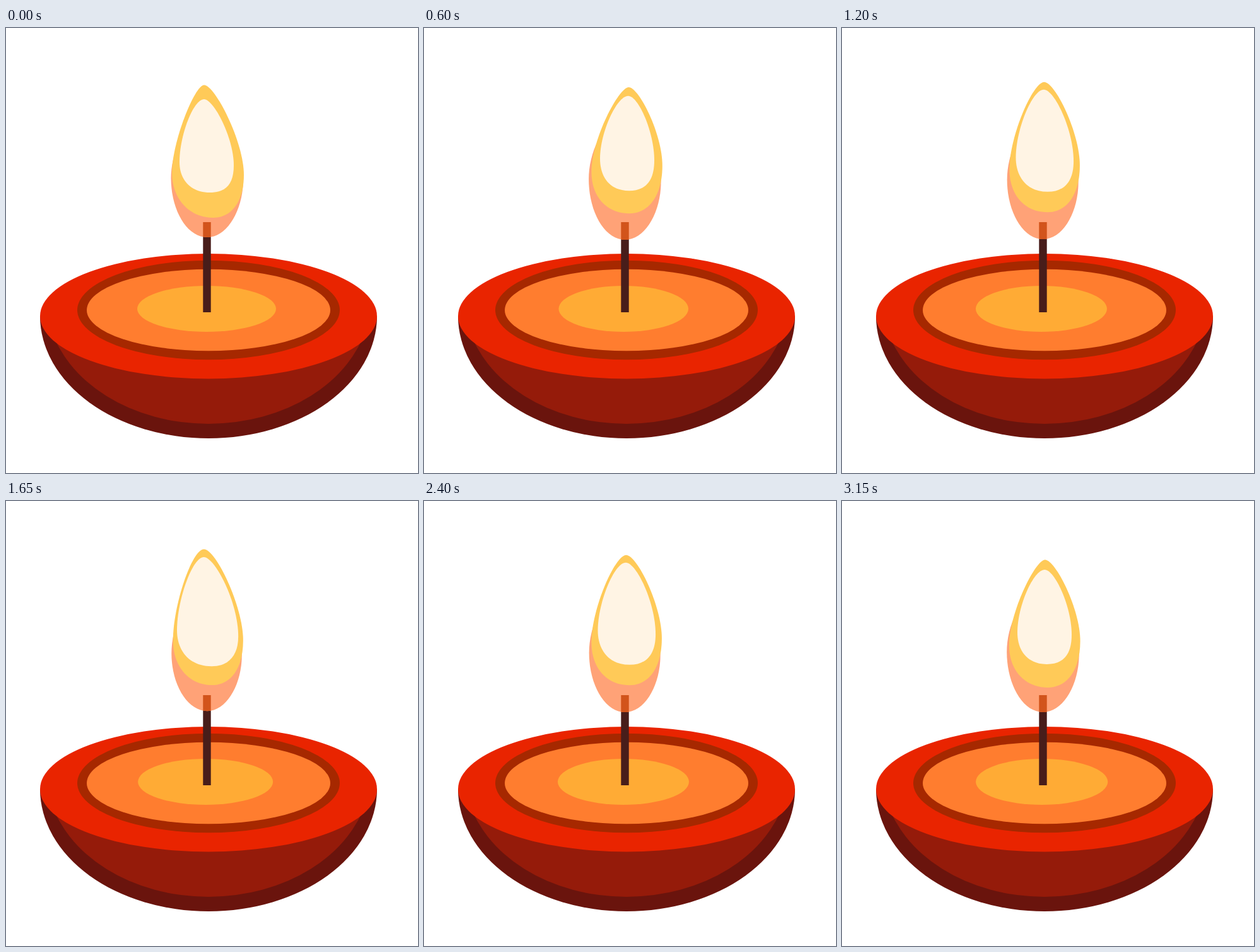
Write an HTML page that moves like this. It is 653 by 706 pixels and loops after 3.3 s.

```html
<!DOCTYPE html>
<html lang="en">
<head>
<meta charset="utf-8">
<title>Oil lamp</title>
<style>
  html, body { margin: 0; width: 100%; height: 100%; overflow: hidden; background: #fff; }
  svg { display: block; width: 653px; height: 706px; }

  /* 22 held poses of 150 ms: lean right, stretch up, settle back, then cut to the start */
  .glow, .flame, .core, .pool { animation: 3300ms infinite; }
  .glow { animation-name: glow; fill: #ffa277; }
  .tip { fill: #d2541b; }
  .flame { animation-name: flame; fill: #ffca58; }
  .core { animation-name: core; fill: #fff4e4; }
  .pool { animation-name: pool; fill: #ffab35; }

  @keyframes glow {
    0% {
      animation-timing-function: steps(5);
      d: path("M319 140C340 140 376 195 376 240C376 288 351 332 319 332C286 332 261.5 288 261.5 238C261.5 200 281 150 319 140Z");
    }
    22.7273% {
      animation-timing-function: steps(7);
      d: path("M319 140C340 140 375.5 200 375.5 245C375.5 294 350 337 318.5 337C286 337 261 292 261 240C261 200 281 150 319 140Z");
    }
    54.5455% {
      animation-timing-function: steps(7);
      d: path("M319 140C340 140 373.5 200 373.5 245C373.5 288 351 332.5 319 332.5C287 332.5 262.5 290 262.5 242C262.5 202 282 150 319 140Z");
    }
    86.3636% {
      animation-timing-function: steps(3);
      d: path("M319 140C340 140 375.5 200 375.5 245C375.5 294 350 337 318.5 337C286 337 261 292 261 240C261 200 281 150 319 140Z");
    }
    100% {
      d: path("M319 140C340 140 375.8 197 375.8 242C375.8 290.4 350.6 334 318.8 334C286 334 261.3 289.6 261.3 238.8C261.3 200 281 150 319 140Z");
    }
  }

  @keyframes flame {
    0% {
      animation-timing-function: steps(5);
      d: path("M314 90.5C331 90.5 377 180 377 233C377 275 358 301 328 301C290 301 263 270 263 230C263 181 299 90.5 314 90.5Z");
    }
    22.7273% {
      animation-timing-function: steps(7);
      d: path("M327 95C343 95 378 165 378 215C378 263 356 292.5 325 292.5C290 292.5 266 268 266 228C266 176 311 95 327 95Z");
    }
    54.5455% {
      animation-timing-function: steps(7);
      d: path("M311.5 73.5C331 73.5 375.5 168 375.5 222C375.5 265 357 292 327 292C290 292 264.5 262 264.5 220C264.5 164 292 73.5 311.5 73.5Z");
    }
    86.3636% {
      animation-timing-function: steps(3);
      d: path("M327 95C343 95 378 165 378 215C378 263 356 292.5 325 292.5C290 292.5 266 268 266 228C266 176 311 95 327 95Z");
    }
    100% {
      d: path("M319.2 92.3C335.8 92.3 377.4 174 377.4 225.8C377.4 270.2 357.2 297.6 326.8 297.6C290 297.6 264.2 269.2 264.2 229.2C264.2 179 303.8 92.3 319.2 92.3Z");
    }
  }

  @keyframes core {
    0% {
      animation-timing-function: steps(5);
      d: path("M314 113C329 113 361 174 361 218C361 246 350 261 323 261C292 261 275 240 275 213C275 170 297 113 314 113Z");
    }
    22.7273% {
      animation-timing-function: steps(7);
      d: path("M326 106.5C342.5 106.5 366 163 366 208C366 240 353 257.5 325.5 257.5C294 257.5 280 234 280 206C280 164 308 106.5 326 106.5Z");
    }
    54.5455% {
      animation-timing-function: steps(7);
      d: path("M311.5 86C329 86 368.5 160 368.5 216C368.5 246 353 263 326 263C290 263 269.5 238 269.5 205C269.5 157 293 86 311.5 86Z");
    }
    86.3636% {
      animation-timing-function: steps(3);
      d: path("M326 106.5C342.5 106.5 366 163 366 208C366 240 353 257.5 325.5 257.5C294 257.5 280 234 280 206C280 164 308 106.5 326 106.5Z");
    }
    100% {
      d: path("M318.8 110.4C334.4 110.4 363 169.6 363 214C363 243.6 351.2 259.6 324 259.6C292.8 259.6 277 237.6 277 210.2C277 167.6 301.4 110.4 318.8 110.4Z");
    }
  }

  @keyframes pool {
    0% { animation-timing-function: steps(5); cx: 318px; rx: 110px; }
    22.7273% { animation-timing-function: steps(7); cx: 315.8px; rx: 101px; }
    54.5455% { animation-timing-function: steps(7); cx: 316.2px; rx: 108px; }
    86.3636% { animation-timing-function: steps(3); cx: 315.8px; rx: 101px; }
    100% { cx: 317.1px; rx: 106.4px; }
  }
</style>
</head>
<body>
<svg viewBox="0 0 653 706">
  <clipPath id="wick"><rect x="312.3" y="308" width="12.4" height="143"/></clipPath>
  <!-- bowl -->
  <path fill="#6a140d" d="M54 457A267 194 0 0 0 588 457Z"/>
  <path fill="#951b0a" d="M69.3 470A257 198 0 0 0 572.7 470Z"/>
  <ellipse fill="#e92400" cx="321" cy="457.2" rx="267" ry="99.2"/>
  <!-- oil -->
  <ellipse fill="#a62800" cx="321" cy="447.5" rx="208" ry="78.7"/>
  <ellipse fill="#ff7d2f" cx="321" cy="447.5" rx="193" ry="64.7"/>
  <ellipse class="pool" cx="318" cy="445.5" rx="110" ry="36.5"/>
  <!-- wick and flame; the wick shows through the glow -->
  <rect fill="#481d1a" x="312.3" y="308" width="12.4" height="143"/>
  <path class="glow"/>
  <g clip-path="url(#wick)"><path class="glow tip"/></g>
  <path class="flame"/>
  <path class="core"/>
</svg>
</body>
</html>
```
